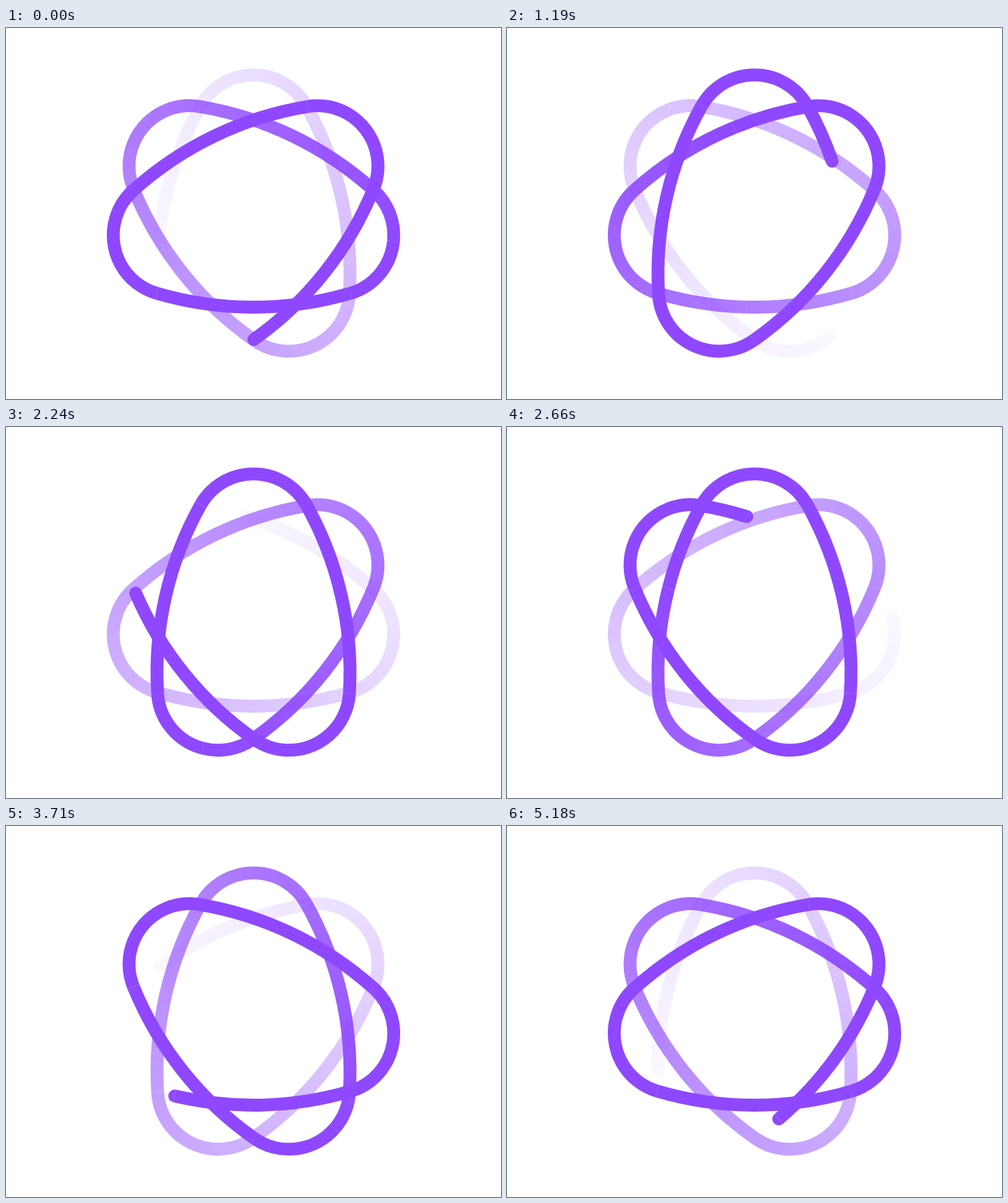
An HTML page with a canvas for the animation above (5.25 s loop, 800x600 px).

```html
<!DOCTYPE html>
<html lang="en">
<head>
<meta charset="utf-8">
<title>Looping knot</title>
<style>
  html, body { margin: 0; width: 100%; height: 100%; overflow: hidden; background: #fff; }
  canvas { display: block; }
</style>
</head>
<body>
<canvas id="stage" width="800" height="600"></canvas>
<script>
const ctx = document.getElementById('stage').getContext('2d');
const { PI, cos, sin, min, max } = Math;

const LOOP = 5250, STEP = 70;
const CX = 400, CY = 305.8;
const LOBE_DIST = 132.2, LOBE_R = 97.8;   // small arcs at the seven tips
const SIDE_DIST = 145.7;                  // centre to the middle of each long arc
const WIDTH = 20.8;

// The long arcs touch two lobes from outside, which fixes their radius and span.
const TURN = 2 * PI / 7, HALF = 1.5 * TURN;
const inset = SIDE_DIST - LOBE_R;
const offset = (LOBE_DIST ** 2 - inset ** 2) / (2 * (inset - LOBE_DIST * cos(HALF)));
const SIDE_R = offset + SIDE_DIST;
const sideSpan = Math.asin(LOBE_DIST * sin(HALF) / (SIDE_R - LOBE_R));
const lobeSpan = HALF - sideSpan;

const arcs = [];
let total = 0;

function addArc(axis, dist, r, span) {
  arcs.push({
    x: CX + dist * cos(axis), y: CY + dist * sin(axis),
    r, from: axis - span, start: total, length: 2 * span * r
  });
  total += 2 * span * r;
}

for (let i = 0; i < 7; i++) {
  const axis = (4 + 3 * i) * TURN - PI / 2;
  addArc(axis, LOBE_DIST, LOBE_R, lobeSpan);
  addArc(axis + HALF, -offset, SIDE_R, sideSpan);
}

const TRAIL = 0.92 * total;
const SOLID = 0.403 * total, FADE = 0.5195 * total;

const alphaAt = behind => max(0.04, min(1, 1 - (behind - SOLID) / FADE));
const purple = alpha => `rgba(143, 72, 255, ${alpha})`;

function drawPiece(arc, lo, hi, head, base) {
  const a = arc.from + (lo - base) / arc.r;
  const b = arc.from + (hi - base) / arc.r;
  const part = (b - a) / (4 * PI);
  const paint = ctx.createConicGradient((a + b) / 2 - PI, arc.x, arc.y);
  paint.addColorStop(0.5 - part, purple(alphaAt(head - lo)));
  paint.addColorStop(0.5 + part, purple(alphaAt(head - hi)));
  ctx.strokeStyle = paint;
  ctx.beginPath();
  ctx.arc(arc.x, arc.y, arc.r, a, b);
  ctx.stroke();
}

function drawCap(s, alpha, isHead) {
  const at = (s % total + total) % total;
  const arc = arcs.find(p => at < p.start + p.length) || arcs[0];
  const angle = arc.from + (at - arc.start) / arc.r;
  ctx.fillStyle = purple(alpha);
  ctx.beginPath();
  ctx.arc(arc.x + arc.r * cos(angle), arc.y + arc.r * sin(angle),
          WIDTH / 2, angle, angle + PI, !isHead);
  ctx.fill();
}

function draw(time) {
  const t = Math.floor(time % LOOP / STEP) * STEP;
  const head = t / LOOP * total - 2;
  const tail = head - TRAIL, solid = head - SOLID;

  ctx.clearRect(0, 0, 800, 600);
  ctx.lineWidth = WIDTH;
  drawCap(tail, alphaAt(TRAIL), false);
  for (const lap of [-2, -1, 0]) {
    for (const arc of arcs) {
      const base = arc.start + lap * total, end = base + arc.length;
      for (const [from, to] of [[tail, solid], [solid, head]]) {
        const lo = max(base, from), hi = min(end, to);
        if (hi > lo) drawPiece(arc, lo, hi, head, base);
      }
    }
  }
  drawCap(head, 1, true);
}

const begin = performance.now();
function tick() {
  draw(performance.now() - begin);
  requestAnimationFrame(tick);
}
tick();
</script>
</body>
</html>
```
